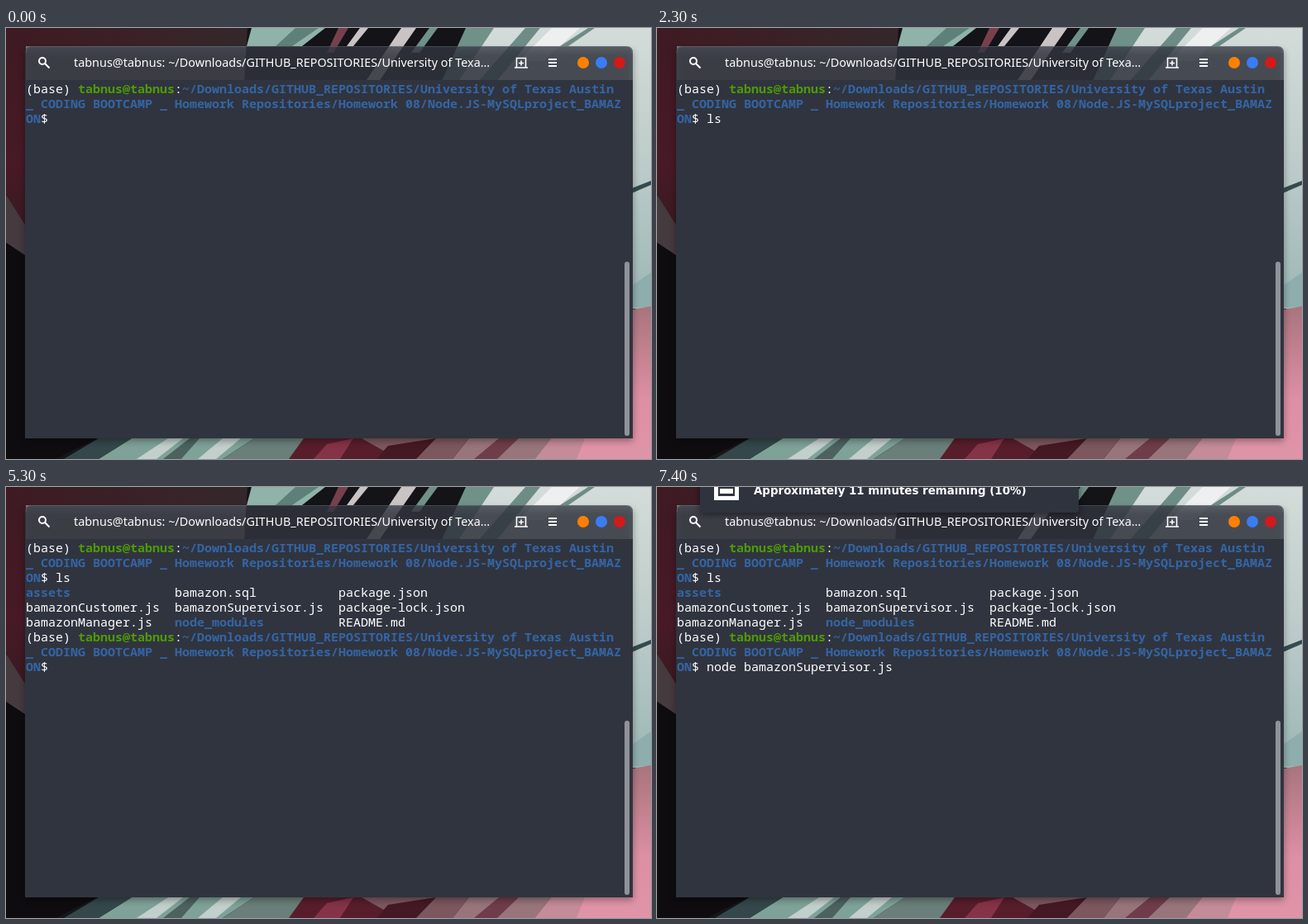
Recreate the animation shown at these times as an HTML page. Size 780 by 522 pixels, loop 8000 ms.

```html
<!DOCTYPE html>
<html lang="en">
<head>
<meta charset="utf-8">
<title>Terminal</title>
<style>
html, body { margin: 0; width: 100%; height: 100%; overflow: hidden; background: #16161a; }
.stage { position: relative; width: 780px; height: 522px; overflow: hidden; }
svg { position: absolute; left: 0; top: 0; }
.title { font: 14.4px "Noto Sans", sans-serif; fill: #fff; }
.note { font: bold 13.4px "DejaVu Sans", sans-serif; fill: #fff; }
pre { position: absolute; left: 24px; top: 64px; margin: 0; color: #fff; font: 15px/18px "Noto Sans Mono", monospace; }
b { font-weight: 700; color: #3465a4; }
b.user { color: #4e9a06; }
.typed, .listing, .late { animation: 8s step-end infinite; }
.typed { animation-name: type; }
.listing { animation-name: list; }
.late { animation-name: late; }
@keyframes type { 0% { opacity: 0; } 6.25%, 100% { opacity: 1; } }
@keyframes list { 0% { opacity: 0; } 43.75%, 100% { opacity: 1; } }
@keyframes late { 0% { opacity: 0; } 81.25%, 100% { opacity: 1; } }
</style>
</head>
<body>
<div class="stage">
<svg width="780" height="522" viewBox="0 0 780 522">
  <defs>
    <linearGradient id="dusk">
      <stop offset="0" stop-color="#3f1a22"/>
      <stop offset=".5" stop-color="#3a2127"/>
      <stop offset="1" stop-color="#33282b"/>
    </linearGradient>
    <linearGradient id="wine" x2="0" y2="1">
      <stop offset="0" stop-color="#3f1a22"/>
      <stop offset=".6" stop-color="#471a26"/>
      <stop offset="1" stop-color="#351a20"/>
    </linearGradient>
    <linearGradient id="ice" x2="0" y2="1">
      <stop offset="0" stop-color="#d3dcd9"/>
      <stop offset=".5" stop-color="#bccbc9"/>
      <stop offset="1" stop-color="#9bb7b5"/>
    </linearGradient>
    <linearGradient id="rose" x2="0" y2="1">
      <stop offset="0" stop-color="#a8747d"/>
      <stop offset=".6" stop-color="#dd8fa3"/>
      <stop offset="1" stop-color="#e094a8"/>
    </linearGradient>
    <filter id="shadow" x="-10%" y="-10%" width="120%" height="120%">
      <feGaussianBlur stdDeviation="4"/>
    </filter>
  </defs>

  <!-- wallpaper -->
  <path fill="url(#dusk)" d="M0 0H300V24H0z"/>
  <path fill="#7d7c7c" d="M23 22H292V66H23z"/>
  <path fill="url(#wine)" d="M0 20H24V262L0 200z"/>
  <path fill="#453a3d" d="M0 202 24 240V276L0 260z"/>
  <path fill="#0e0c0f" d="M0 260 24 276V497H110L60 522H0z"/>
  <path fill="#131318" d="M292 0H600V66H288z"/>
  <path fill="#8fb3a8" d="M297 0H386L358 22H291z"/>
  <path fill="#5d8078" d="M350 0H378L346 22H326z"/>
  <path fill="#c9c3c4" d="M428 0H438L420 22H412zM478 0H496L450 66H434z"/>
  <path fill="#78404c" d="M402 0H414L396 30H388z"/>
  <path fill="#6f9188" d="M512 0H522L500 30H490zM556 0H600L560 66H526z"/>
  <path fill="url(#ice)" d="M590 0H780V340H750V66H546z"/>
  <path fill="#6e8c86" d="M628 0H646L592 66H570zM704 0H712L680 22H670z"/>
  <path fill="#eef0ef" d="M660 0H694L650 40H620z"/>
  <path fill="#344c50" d="M757 194 780 185V190L757 200z"/>
  <path fill="#8eaead" d="M757 312 780 296V338H757z"/>
  <path fill="url(#rose)" d="M757 341 780 337V522H640V497H757z"/>
  <path fill="#7fa298" d="M112 522 152 497H300L262 522z"/>
  <path fill="#34474a" d="M70 522 112 497H152L112 522z"/>
  <path fill="#c2cfca" d="M158 522 196 497H214L182 522zM232 522 262 497H284L254 522z"/>
  <path fill="#4b625f" d="M190 522 222 497H234L212 522z"/>
  <path fill="#6a7f79" d="M262 522 300 497H368L350 522z"/>
  <path fill="#581d2b" d="M342 522 360 497H430L474 522z"/>
  <path fill="#853447" d="M372 522 388 504 420 497 404 522z"/>
  <path fill="#7c575e" d="M430 497H560L540 522H474z"/>
  <path fill="#451923" d="M448 522 462 506 520 497 496 522z"/>
  <path fill="#97757b" d="M540 522 560 497H660L640 522z"/>
  <path fill="#6f3d49" d="M566 522 596 497H620L594 522z"/>
  <path fill="#c48b98" d="M640 522 660 497H700L690 522z"/>

  <!-- window -->
  <path d="M23 28H758V500H23z" opacity=".35" filter="url(#shadow)"/>
  <path fill="#353943" fill-opacity=".77" d="M23 63V30Q23 22 31 22H750Q758 22 758 30V63z"/>
  <path fill="none" stroke="#fff" stroke-opacity=".12" d="M24 30Q24 22.5 31 22.5H750Q757 22.5 757 30"/>
  <path fill="#30343f" d="M23 63H758V497H23z"/>
  <rect x="748" y="283" width="6" height="211" rx="3" fill="#909299"/>
  <g fill="none" stroke="#fff" stroke-width="2">
    <circle cx="44" cy="40" r="4"/>
    <path d="M47 43 52.5 48.5M656 38H666M656 42H666M656 46H666"/>
    <path stroke-width="1.6" d="M615 48H617.5V36.5H628.5V48H631M617.5 48H628.5M623 39.5V45.5M620 42.5H626"/>
  </g>
  <circle cx="698" cy="42" r="7" fill="#ff8000"/>
  <circle cx="720" cy="42" r="7" fill="#3a7cf5"/>
  <circle cx="742" cy="42" r="7" fill="#d41919"/>
  <text class="title" x="82" y="47">tabnus@tabnus: ~/Downloads/GITHUB_REPOSITORIES/University of Texa…</text>

  <!-- battery notice -->
  <g class="late">
    <rect x="52" y="-20" width="458" height="53" rx="4" opacity=".5" filter="url(#shadow)"/>
    <rect x="52" y="-20" width="458" height="51" rx="3" fill="#2f333e"/>
    <path fill="#fff" d="M69-10H99V16H69z"/>
    <path fill="#2f333e" d="M74-8H94V11H74z"/>
    <path fill="#fff" d="M76 2H92V8H76z"/>
    <text class="note" x="117" y="9">Approximately 11 minutes remaining (10%)</text>
  </g>
</svg>
<pre>(base) <b class="user">tabnus@tabnus</b>:<b>~/Downloads/GITHUB_REPOSITORIES/University of Texas Austin
_ CODING BOOTCAMP _ Homework Repositories/Homework 08/Node.JS-MySQLproject_BAMAZ
ON</b>$ <span class="typed">ls</span>
<span class="listing"><b>assets</b>              bamazon.sql           package.json
bamazonCustomer.js  bamazonSupervisor.js  package-lock.json
bamazonManager.js   <b>node_modules</b>          README.md
(base) <b class="user">tabnus@tabnus</b>:<b>~/Downloads/GITHUB_REPOSITORIES/University of Texas Austin
_ CODING BOOTCAMP _ Homework Repositories/Homework 08/Node.JS-MySQLproject_BAMAZ
ON</b>$ </span><span class="late">node bamazonSupervisor.js</span></pre>
</div>
</body>
</html>
```
